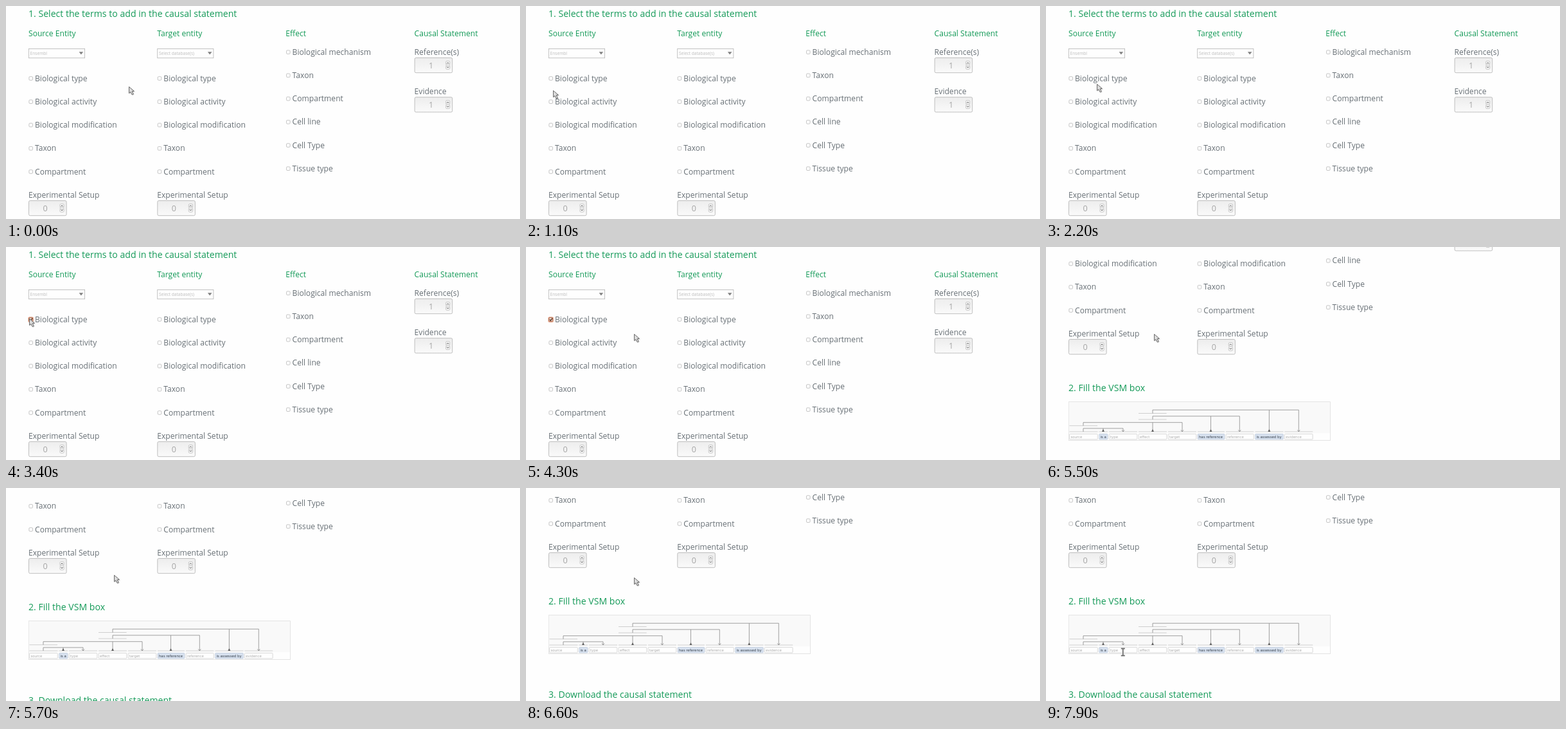
An HTML page for the animation above (8 s loop, 800 by 331 pixels).

```html
<!DOCTYPE html>
<html lang="en">
<head>
<meta charset="utf-8">
<title>Causal statement form</title>
<style>
  html, body { margin: 0; width: 100%; height: 100%; overflow: hidden; background: #fefefe; }
  svg { display: block; width: 100%; height: 100%; }
  text { font-family: "Open Sans", sans-serif; font-size: 12.1px; fill: #687076; white-space: pre; }
  .head { fill: #149a58; }
  .title { font-size: 14.1px; }
  .hint { font-size: 6.6px; fill: #bcbcbc; }
  .num { font-size: 12.6px; fill: #a6a6a6; text-anchor: middle; }
  .term { font-family: "DejaVu Sans", sans-serif; font-size: 5.45px; fill: #adadad; }
  .verb { fill: #36404c; }
  .wire { fill: none; stroke: #8a8a8a; stroke-width: .8; }
  .bar { fill: none; stroke: #c4c4c4; stroke-width: .8; }
</style>
</head>
<body>
<svg id="stage" viewBox="0 0 800 331" preserveAspectRatio="none">
  <defs>
    <linearGradient id="shade" x1="0" y1="0" x2="0" y2="1">
      <stop offset="0" stop-color="#ededed"/>
      <stop offset="1" stop-color="#fafafa"/>
    </linearGradient>
  </defs>
  <g id="page"></g>
  <g id="pointer">
    <path d="M1.5 1.5V12L4 9.8L6.2 14L8.6 12.8L6.6 8.8L10 8.4Z" fill="#000" opacity=".16"/>
    <path d="M.5 .5V10.6L2.9 8.5L5.2 12.9L7.3 11.9L5.2 7.7L8.4 7.3Z" fill="#dcdcdc" stroke="#5c5c5c" stroke-width=".9" stroke-linejoin="round"/>
  </g>
  <g id="beam" fill="none">
    <path d="M-3 -5.5H3M0 -5.5V5.5M-3 5.5H3" stroke="#e6e6e6" stroke-width="3"/>
    <path d="M-3 -5.5H3M0 -5.5V5.5M-3 5.5H3" stroke="#666" stroke-width="1.5"/>
  </g>
</svg>
<script>
const LOOP = 8000, STEP = 100, CHECK_AT = 3400, SCROLL_AT = 5200;
const $ = id => document.getElementById(id);
const NS = "http://www.w3.org/2000/svg";

function add(parent, tag, attrs, content) {
  const el = document.createElementNS(NS, tag);
  for (const k in attrs) el.setAttribute(k, attrs[k]);
  if (content !== undefined) el.textContent = content;
  parent.appendChild(el);
  return el;
}

const page = $("page");
const label = (x, y, s, cls = "") => add(page, "text", { x, y, class: cls }, s);
const rect = (x, y, width, height, fill, stroke, rx = 0) =>
  add(page, "rect", { x, y, width, height, fill, stroke, rx, "stroke-width": .8 });
const path = (d, attrs) => add(page, "path", { d, ...attrs });

function checkRow(x, y, s) {
  rect(x + .9, y - 6.9, 5.6, 5.6, "#fcfcfc", "#b9b9b9", 1.3);
  label(x + 10, y, s);
}

function numberBox(x, y, value) {
  rect(x + .5, y + .5, 58.6, 23.2, "url(#shade)", "#b0b0b0", 2);
  label(x + 26, y + 16.6, value, "num");
  rect(x + 49, y + 5.6, 6.2, 6.3, "#f7f7f7", "#bdbdbd", 1.5);
  rect(x + 49, y + 11.9, 6.2, 6.3, "#f7f7f7", "#bdbdbd", 1.5);
  path(`M${x + 50.4} ${y + 9.8}l1.7 -2l1.7 2M${x + 50.4} ${y + 14}l1.7 2l1.7 -2`,
    { fill: "none", stroke: "#666", "stroke-width": 1 });
}

function entity(x, name, hint) {
  label(x, 46.8, name, "head");
  rect(x + .4, 66.4, 87.2, 14.4, "#fefefe", "#b4b4b4");
  label(x + 2.6, 75.9, hint, "hint");
  path(`M${x + 78.6} 71.2h6.6l-3.3 4.2z`, { fill: "#808080" });
  ["Biological type", "Biological activity", "Biological modification", "Taxon", "Compartment"]
    .forEach((s, i) => checkRow(x, 116.6 + 36.25 * i, s));
  label(x, 297.7, "Experimental Setup");
  numberBox(x, 302, 0);
}

// one connector: left foot, middle triangle, right arrow
function connector(y, left, mid, right, base, foot) {
  path(`M${left} ${foot}V${y}H${right}V${base}M${mid} ${y}V${base}`, { class: "wire" });
  path(`M${mid - 2} ${base}h4l-2 -4z`, { fill: "#606060" });
  path(`M${right - 2} ${base - 2.6}l2 2.6l2 -2.6`, { class: "wire" });
}

function vsmBox(y) {
  rect(35.4, y + .4, 407, 60, "#fefefe", "#dedede");
  rect(35.8, y + .8, 406.2, 48.2, "#f9f9f9", "none");
  const base = y + 46.8;
  const terms = [[36.5, 44, "source"], [82.5, 13.6, "is a", 1], [98, 44, "type"], [144, 44, "effect"],
    [190, 44, "target"], [236, 42, "has reference", 1], [280, 43.5, "reference"],
    [325.5, 44, "is assessed by", 1], [371.3, 44, "evidence"]];
  for (const [x, w, s, verb] of terms) {
    path(`M${x} ${base}h${w}`, { class: "bar" });
    rect(x + .2, y + 50.4, w - .4, 8.4, verb ? "#d8e2f0" : "#fefefe", verb ? "#bcc8da" : "#d0d0d0", .8);
    label(x + 1.9, y + 56.7, s, verb ? "term verb" : "term");
  }
  for (const [x, h] of [[36.5, 37.5], [144, 27.8], [144, 18.3]])
    path(`M${x} ${y + h}h43.6`, { class: "bar" });
  connector(y + 41.7, 58, 89, 120, base, base);
  connector(y + 32.5, 58, 166, 212, base, y + 37.5);
  connector(y + 22.7, 166, 256.5, 301.3, base, y + 27.8);
  connector(y + 13, 166, 347.4, 393.3, base, y + 18.3);
}

label(35, 17, "1. Select the terms to add in the causal statement", "head title");
entity(35, "Source Entity", "Ensembl");
entity(235.3, "Target entity", "Select database(s)");
label(435.3, 46.8, "Effect", "head");
["Biological mechanism", "Taxon", "Compartment", "Cell line", "Cell Type", "Tissue type"]
  .forEach((s, i) => checkRow(435.6, 75.8 + 36.2 * i, s));
label(635.6, 46.8, "Causal Statement", "head");
label(635.6, 75.8, "Reference(s)");
numberBox(635.6, 80, 1);
label(635.6, 137, "Evidence");
numberBox(635.6, 141.2, 1);
label(35, 383, "2. Fill the VSM box", "head title");
vsmBox(399.2);
label(35, 527.7, "3. Download the causal statement", "head title");

const tick = add(page, "g", {});
add(tick, "rect", { x: 34.3, y: 108.4, width: 8.6, height: 8.8, rx: 2, fill: "#e9b49c" });
add(tick, "rect", { x: 35.7, y: 109.7, width: 5.9, height: 6, rx: 1.2, fill: "#e8d3c8", stroke: "#a8593a", "stroke-width": .9 });
add(tick, "path", { d: "M36.8 112.6l1.5 1.8l2.7 -3.7", fill: "none", stroke: "#54301f", "stroke-width": 1.3 });

// time, x, y
const moves = [[200, 191, 125], [1100, 42, 131], [1500, 46, 117], [1900, 84, 122], [2000, 84, 122],
  [2200, 79, 121], [2900, 36, 111], [3800, 36, 111], [4300, 168, 135], [6500, 168, 135],
  [6600, 168, 139], [7300, 111.5, 256], [7400, 111.5, 256], [7500, 113, 256], [7600, 113, 256],
  [7900, 119.8, 255]];
const scrolls = [13, 58, 112, 159, 181, 193, 199, 202];

function pointerAt(t) {
  const i = moves.findIndex(m => m[0] >= t);
  if (i <= 0) return moves[i < 0 ? moves.length - 1 : 0].slice(1);
  const [t0, x0, y0] = moves[i - 1], [t1, x1, y1] = moves[i];
  const u = (t - t0) / (t1 - t0), e = u * u * (3 - 2 * u);
  return [x0 + (x1 - x0) * e, y0 + (y1 - y0) * e];
}

function render(ms) {
  const t = Math.floor((ms % LOOP) / STEP) * STEP;
  const i = Math.min((t - SCROLL_AT) / STEP, scrolls.length - 1);
  page.setAttribute("transform", `translate(0 ${i < 0 ? 0 : -scrolls[i]})`);
  tick.setAttribute("visibility", t >= CHECK_AT ? "visible" : "hidden");
  const [x, y] = pointerAt(t), typing = y > 247;
  for (const [id, on] of [["pointer", !typing], ["beam", typing]]) {
    $(id).setAttribute("transform", `translate(${x} ${y})`);
    $(id).setAttribute("visibility", on ? "visible" : "hidden");
  }
}

const start = performance.now();
function frame() {
  render(performance.now() - start);
  requestAnimationFrame(frame);
}
frame();
</script>
</body>
</html>
```
